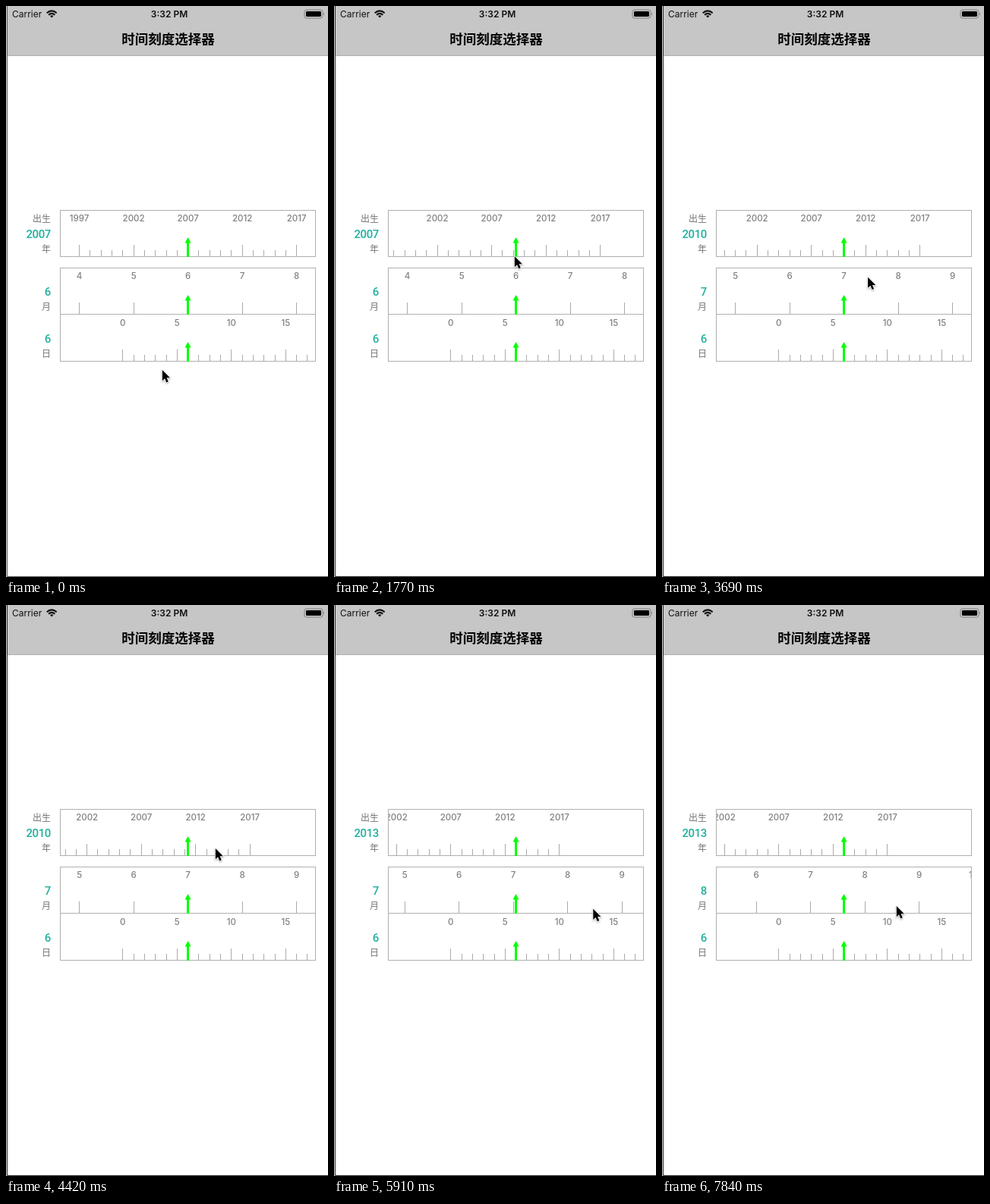
Animation of 424 by 753 pixels, one loop 7990 ms. Source, as an HTML page:

```html
<!DOCTYPE html>
<html lang="zh">
<head>
<meta charset="utf-8">
<title>时间刻度选择器</title>
<style>
html, body { margin: 0; width: 100%; height: 100%; overflow: hidden; background: #fff; }
svg { display: block; width: 424px; height: 753px; }
text { font-family: Inter, "Noto Sans", sans-serif; }
.status { font-size: 12px; fill: #111; }
.title { font: 700 17.5px "Noto Sans CJK SC", "Noto Sans CJK", sans-serif; text-anchor: middle; }
.unit { font: 12px "Noto Sans CJK SC", "Noto Sans CJK", sans-serif; fill: #777; text-anchor: end; }
.value { font: 500 15px Roboto, sans-serif; letter-spacing: -.4px; fill: #1fb09c; text-anchor: end; }
.scale { font-size: 11.5px; font-weight: 500; fill: #808080; text-anchor: middle; }
.tick { stroke: #aaa; shape-rendering: crispEdges; }
.box { fill: none; stroke: #b0b0b0; }
.arrow { fill: #0f0; }
</style>
</head>
<body>
<svg viewBox="0 0 424 753">
  <rect width="424" height="66" fill="#c6c6c6"/>
  <rect y="65" width="424" height="1" fill="#aeaeae"/>
  <rect width="1" height="753" fill="#ddd"/>
  <path id="edge" d="M1.5 0V752.5H424" fill="none"/>

  <text class="status" x="8" y="15">Carrier</text>
  <g fill="none" stroke="#111" stroke-width="2">
    <path d="M53.7 9.3Q60.2 3.5 66.7 9.3M56 11.8Q60.2 8 64.4 11.8"/>
    <path d="M58 13.2Q60.2 11.4 62.4 13.2L60.2 15.6Z" fill="#111" stroke="none"/>
  </g>
  <text class="status" x="215" y="15" font-weight="600" text-anchor="middle">3:32 PM</text>
  <rect x="393" y="5" width="24" height="11" rx="2.5" fill="none" stroke="#808080"/>
  <rect x="395" y="7" width="20" height="7" rx="1.2" fill="#000"/>
  <path d="M418 8.5Q420 10.5 418 12.5Z" fill="#888"/>
  <text class="title" x="213.5" y="49.5">时间刻度选择器</text>

  <text class="unit" x="59" y="284.5">出生</text>
  <g id="rulers"></g>
  <g id="arrows"></g>
  <path id="cursor" d="M0 0V14.2L3.3 11.2L5.5 16.4L8 15.3L5.8 10.3H10.2Z" fill="#000" stroke="#fff"
        stroke-width="1.6" paint-order="stroke" style="filter:drop-shadow(0 1px 1px #0005)"/>
</svg>
<script>
const LOOP = 7990, HOLD = 300, STEP = 147.5;
const LEFT = 72, RIGHT = 407, CENTER = 239.6;
const SLOP = 10;   // pixels the pointer travels before a ruler follows
const SNAP = 1.5;  // steps a released ruler needs to settle
const $ = id => document.getElementById(id);

function add(parent, tag, attrs, content = "") {
  const node = document.createElementNS("http://www.w3.org/2000/svg", tag);
  for (const name in attrs) node.setAttribute(name, attrs[name]);
  node.textContent = content;
  parent.append(node);
  return node;
}

// Builds one ruler; `start` is the number under the arrow at rest.
function ruler(id, top, bottom, { min, max, start, gap, every, unit }) {
  const root = $("rulers"), labels = [];
  const clip = add(root, "clipPath", { id });
  add(clip, "rect", { x: LEFT, y: top, width: RIGHT - LEFT, height: bottom - top });
  const strip = add(add(root, "g", { "clip-path": `url(#${id})` }), "g", {});
  for (let n = min; n <= max; n++) {
    const x = CENTER + (n - start) * gap, major = (n - min) % every === 0;
    add(strip, "line", { class: "tick", x1: x, x2: x, y1: bottom - (major ? 15 : 8), y2: bottom });
    if (major) labels.push({ x, node: add(strip, "text", { class: "scale", x, y: bottom - 46.5 }, n) });
  }
  add(root, "rect", { class: "box", x: LEFT - .5, y: top + .5, width: RIGHT - LEFT + 1, height: bottom - top });
  add($("arrows"), "path", {
    class: "arrow",
    d: `M239.5 ${bottom - 25}l4 7.5h-2.5V${bottom + 1}h-3V${bottom - 17.5}h-2.5Z`
  });
  const value = add(root, "text", { class: "value", x: 59, y: bottom - 24 }, start);
  add(root, "text", { class: "unit", x: 59, y: bottom - 5 }, unit);
  return { strip, labels, value, start, gap };
}

const year = ruler("year", 269, 330, { min: 1997, max: 2017, start: 2007, gap: 14.3, every: 5, unit: "年" });
const month = ruler("month", 345, 406, { min: 1, max: 12, start: 6, gap: 71.5, every: 1, unit: "月" });
ruler("day", 406, 468, { min: 0, max: 31, start: 6, gap: 14.3, every: 5, unit: "日" });

// Turning points of the pointer: step, x, y
const path = [
  [0, 205, 479], [8, 279, 329], [12, 223, 329], [16, 300, 383], [17, 284, 399], [19, 258, 403],
  [20, 204, 402], [26, 303.5, 334], [29, 275, 320], [31, 256, 320], [33, 256, 326], [34, 262, 358],
  [37, 354, 425], [38, 354, 400], [42, 300, 399], [44, 300, 399], [45, 290, 403], [48, 270.5, 401],
  [52, 308, 396]
];
const drags = [
  { target: year, grab: 8, drop: 12 },
  { target: month, grab: 17, drop: 20 },
  { target: year, grab: 26, drop: 33 },
  { target: month, grab: 38, drop: 44.5 },
  { target: month, grab: 48, drop: Infinity }
];

function pointer(step) {
  const i = Math.max(1, path.findIndex(p => p[0] >= step));
  const [s0, x0, y0] = path[i - 1], [s1, x1, y1] = path[i];
  const u = (step - s0) / (s1 - s0);
  return { x: x0 + (x1 - x0) * u, y: y0 + (y1 - y0) * u };
}

// A ruler follows the pointer while held, then settles on the nearest number.
function pose(target, step) {
  const { gap, start } = target;
  let offset = 0, value = start;
  for (const { grab, drop } of drags.filter(d => d.target === target && step >= d.grab)) {
    const pull = pointer(grab).x - pointer(Math.min(step, drop)).x;
    offset += Math.sign(pull) * Math.max(0, Math.abs(pull) - SLOP);
    if (step < drop) break;
    const count = Math.round(offset / gap), u = Math.min(1, (step - drop) / SNAP);
    offset += (count * gap - offset) * u * u * (3 - 2 * u);
    value = start + count;
  }
  return { offset, value };
}

function drawRuler(target, step) {
  const { offset, value } = pose(target, step), half = target.gap / 2;
  target.strip.setAttribute("transform", `translate(${-offset} 0)`);
  target.value.textContent = value;
  // A label disappears together with the cell that holds it.
  for (const { x, node } of target.labels) {
    const inside = x - offset + half > LEFT && x - offset - half < RIGHT;
    node.setAttribute("visibility", inside ? "visible" : "hidden");
  }
}

function draw(now) {
  const t = now % LOOP;
  const step = t < HOLD ? 0 : Math.min(52, Math.floor((t - HOLD) / STEP + .12) + 1);
  const { x, y } = pointer(step);
  $("cursor").setAttribute("transform", `translate(${x + .8} ${y + 1})`);
  drawRuler(year, step);
  drawRuler(month, step);
  $("edge").setAttribute("stroke", step < 9 ? "#555" : "#222");
  requestAnimationFrame(draw);
}
draw(0);
</script>
</body>
</html>
```
